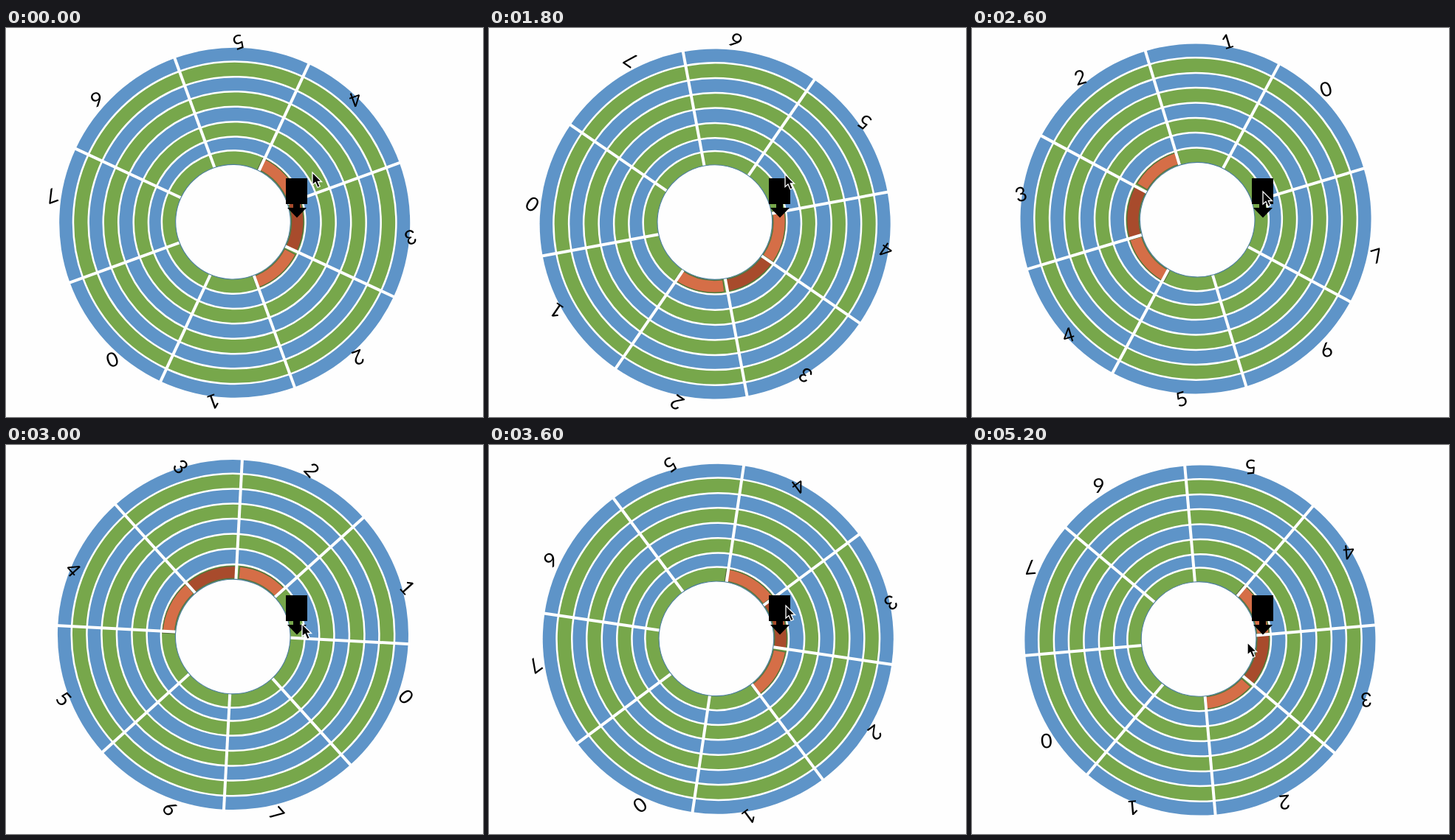
These frames come from a looping animation (646 by 528 pixels, 5400 ms). An HTML page:

```html
<!DOCTYPE html>
<html lang="en">
<head>
<meta charset="utf-8">
<title>Rotating disk</title>
<style>
html, body { margin: 0; width: 100%; height: 100%; overflow: hidden; background: #fefefe; }
svg { display: block; width: 646px; height: 528px; }
text { font: 27px Lato, Carlito, "Open Sans", sans-serif; text-anchor: middle; }
</style>
</head>
<body>
<svg id="stage" viewBox="0 0 646 528">
  <g id="disk"></g>
  <path d="M379 204H408V239H398V244H407L394 257.500L381 244H389V239H379Z"/>
  <path id="cursor" d="M0 0V17L4 13.500L7 20.500L10.200 19L7.300 12.500H12.500Z" stroke="#fff" stroke-width="1.300"/>
</svg>
<script>
const LOOP = 5400, STEP = 200;
const BLUE = '#5e94c8', GREEN = '#77a74b', ORANGE = '#d56e47', RUST = '#a84b2c';
const PIVOT = [306.3, 261.7];
// The rings sit slightly off the pivot, which makes the disk wobble.
const HUB = [-2.3, -3.6], CORE = [-0.6, -1.8], INNER = [-1.2, -2.3];
const RADII = [237.5, 218.7, 198, 178, 157.5, 137, 116.8, 97.3];
const LABELS = [[217, -121.5], [107.7, -222], [-97, -232.5], [-219.5, -103.6],
                [-213, 98], [-91.2, 225], [116, 217.5], [218, 115.3]];

// Keyframes: time, values...
const SPIN = [[0, 160], [1460, 160], [2200, 278.6], [3000, 408], [3600, 503.4], [3800, 535]];
const POINTER = [[0, 415, 196], [1400, 415, 196], [2200, 387, 201], [3000, 401, 243],
                 [3600, 402, 218], [4400, 400, 237], [5200, 373, 268]];

const disk = document.getElementById('disk');
const cursor = document.getElementById('cursor');

function add(name, attrs, content = '') {
  const node = document.createElementNS('http://www.w3.org/2000/svg', name);
  for (const key in attrs) node.setAttribute(key, attrs[key]);
  node.textContent = content;
  disk.append(node);
}

// Angles run clockwise from the top.
function polar([x, y], radius, degrees) {
  const a = degrees * Math.PI / 180;
  return [x + radius * Math.sin(a), y - radius * Math.cos(a)];
}

function circle([cx, cy], r, fill, stroke, width) {
  add('circle', { cx, cy, r, fill, stroke, 'stroke-width': width });
}

function block(from, to, fill) {
  const near = 79, far = 95.5;
  const d = `M${polar(CORE, near, from)}L${polar(CORE, far, from)}` +
    `A${far} ${far} 0 0 1 ${polar(CORE, far, to)}L${polar(CORE, near, to)}` +
    `A${near} ${near} 0 0 0 ${polar(CORE, near, from)}Z`;
  add('path', { d, fill, stroke: '#56713f', 'stroke-width': 1.3 });
}

function buildDisk() {
  RADII.forEach((r, i) => {
    const center = i === 7 ? INNER : HUB;
    circle(center, r, i % 2 ? GREEN : BLUE, i ? '#fff' : 'none', 2.5);
  });
  block(225, 270, ORANGE);
  block(270, 315, RUST);
  block(317.6, 360, ORANGE);
  for (let a = 0; a < 360; a += 45) {
    add('path', { d: `M${polar(HUB, 70, a)}L${polar(HUB, 240, a)}`, stroke: '#fff', 'stroke-width': 4 });
  }
  circle(CORE, 77.8, '#fefefe', '#4d7f9e', 1.1);
  LABELS.forEach(([x, y], i) => add('text', { x, y: y + 9.7 }, i));
}

function sample(keys, t) {
  const next = keys.findIndex(key => key[0] > t);
  if (next < 0) return keys[keys.length - 1].slice(1);
  const a = keys[next - 1], b = keys[next];
  const k = (t - a[0]) / (b[0] - a[0]);
  return a.slice(1).map((v, i) => v + (b[i + 1] - v) * k);
}

function draw(now) {
  const t = Math.floor(now % LOOP / STEP) * STEP;
  disk.setAttribute('transform', `translate(${PIVOT}) rotate(${sample(SPIN, t)})`);
  cursor.setAttribute('transform', `translate(${sample(POINTER, t)})`);
}

buildDisk();
draw(0);
let start;
requestAnimationFrame(function tick(now) {
  start ??= now;
  draw(now - start);
  requestAnimationFrame(tick);
});
</script>
</body>
</html>
```
